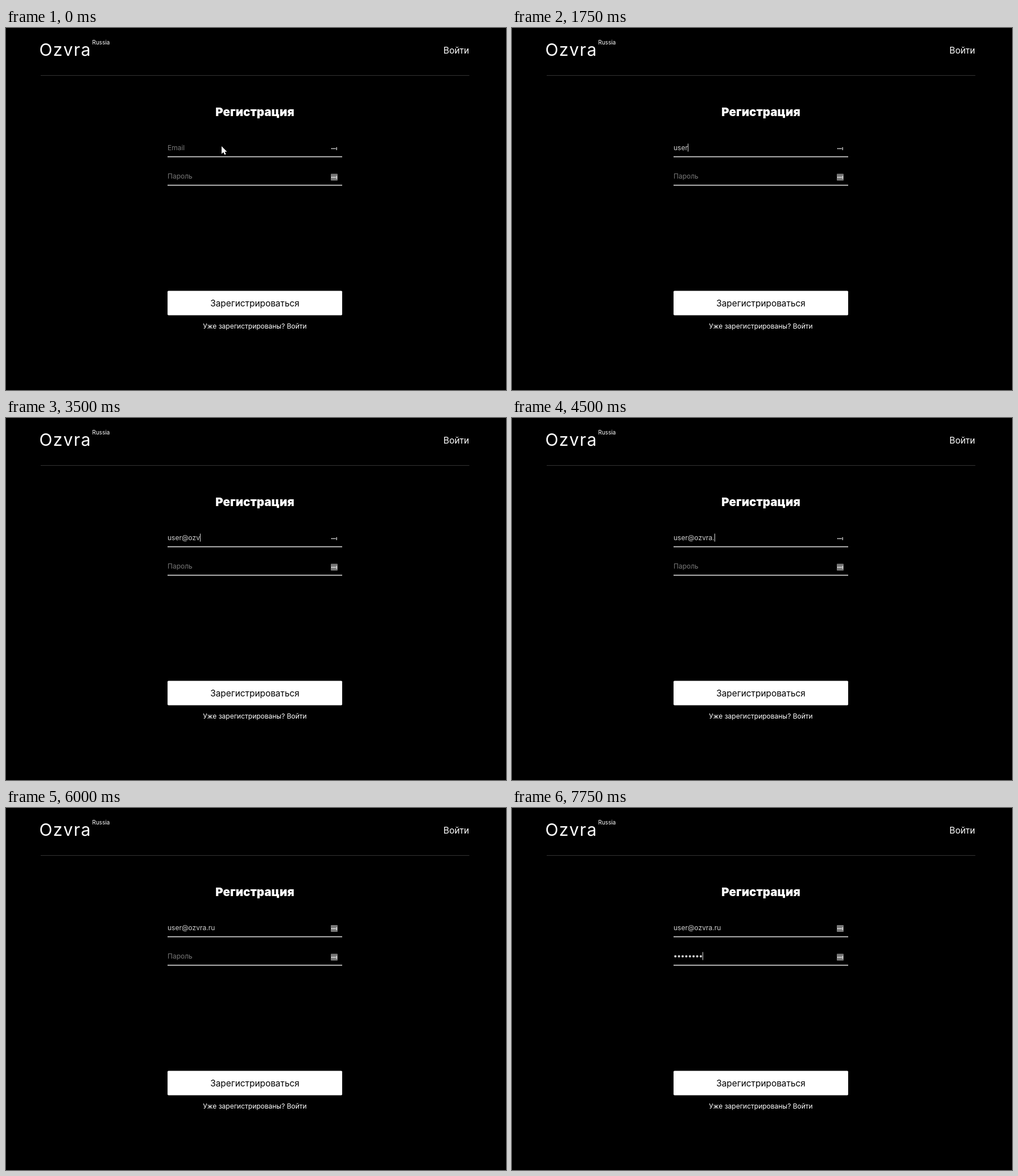
Write an HTML page that moves like this. It is 879x637 px and loops after 8 s.

```html
<!DOCTYPE html>
<html lang="ru">
<head>
<meta charset="utf-8">
<title>Регистрация</title>
<style>
  html, body { margin: 0; width: 100%; height: 100%; overflow: hidden; background: #000; }
  svg { display: block; font: 12px Inter, sans-serif; fill: #fff; }
  .link { font-size: 15.4px; }
  .hint { fill: #777; }
  .value, .underline, #dots { fill: #d0d0d0; }
</style>
</head>
<body>
<svg width="879" height="637" viewBox="0 0 879 637">
  <defs>
    <g id="keyIcon">
      <circle cx="2" cy="6.2" r="1"/>
      <circle cx="4.7" cy="6.2" r="1"/>
      <circle cx="7.4" cy="6.2" r="1"/>
      <rect x="9.6" y="3.8" width="1.2" height="5"/>
    </g>
  </defs>

  <text x="58.5" y="48.5" font-size="30" letter-spacing="1.4">Ozvra</text>
  <text x="151.5" y="28.5" font-size="10">Russia</text>
  <text class="link" x="814" y="45" text-anchor="end">Войти</text>
  <rect x="61" y="83" width="753.5" height="1" fill="#333"/>

  <text x="437.5" y="155" font-size="20.6" font-weight="900" text-anchor="middle">Регистрация</text>

  <text id="emailHint" class="hint" x="284" y="214.5">Email</text>
  <text id="email" class="value" x="284" y="214.5"></text>
  <rect class="underline" x="284" y="225.7" width="307" height="1.7"/>
  <rect id="emailBox" x="571" y="206" width="12" height="12" rx="1" fill="#777"/>
  <use href="#keyIcon" x="571" y="206"/>

  <text id="passwordHint" class="hint" x="284" y="264.5">Пароль</text>
  <g id="dots"></g>
  <rect class="underline" x="284" y="275.8" width="307" height="1.7"/>
  <rect x="571" y="256.5" width="12" height="12" rx="1" fill="#777"/>
  <use href="#keyIcon" x="571" y="256.5"/>

  <rect id="caret" width="1" height="14" fill="#ddd"/>

  <rect x="284" y="462.5" width="307" height="43" rx="1.7"/>
  <text class="link" x="437.5" y="489.7" text-anchor="middle" fill="#000">Зарегистрироваться</text>
  <text x="437.5" y="529.2" text-anchor="middle">Уже зарегистрированы? Войти</text>

  <path id="pointer" d="M379 208V221.5L382.2 218.6L384.4 223L386.6 222L384.6 217.7H388.5Z"/>
</svg>
<script>
const LOOP = 8000;
const ADDRESS = 'user@ozvra.ru';
const DOT_STEP = 6.4;
const PASSWORD_FOCUS = 5500;

// Key press times in ms
const emailKeys = [750, 1000, 1500, 1750, 2250, 2750, 3000, 3500, 4000, 4250, 4500, 4750, 5000];
const passwordKeys = [6250, 6500, 6500, 7000, 7000, 7250, 7500, 7750];

const el = id => document.getElementById(id);
const show = (id, on) => el(id).setAttribute('visibility', on ? 'visible' : 'hidden');
const typed = (keys, t) => keys.filter(k => k <= t).length;

el('dots').innerHTML = passwordKeys
  .map((_, i) => `<circle cx="${287.2 + i * DOT_STEP}" cy="261" r="2.1"/>`).join('');

function render(t) {
  const letters = typed(emailKeys, t);
  const bullets = typed(passwordKeys, t);
  const inPassword = t >= PASSWORD_FOCUS;

  el('email').textContent = ADDRESS.slice(0, letters);
  [...el('dots').children].forEach((dot, i) =>
    dot.setAttribute('visibility', i < bullets ? 'visible' : 'hidden'));
  show('emailHint', !letters);
  show('passwordHint', !bullets);
  show('emailBox', inPassword);
  show('pointer', !letters);

  const width = inPassword ? bullets * DOT_STEP : letters && el('email').getComputedTextLength();
  el('caret').setAttribute('x', Math.round(284 + width));
  el('caret').setAttribute('y', inPassword ? 253.5 : 203.5);
  show('caret', bullets || (letters && !inPassword) || (t >= 250 && t < 500) || (inPassword && t < 6000));
}

function tick(now) {
  render(now % LOOP);
  requestAnimationFrame(tick);
}
render(0);
requestAnimationFrame(tick);
</script>
</body>
</html>
```
